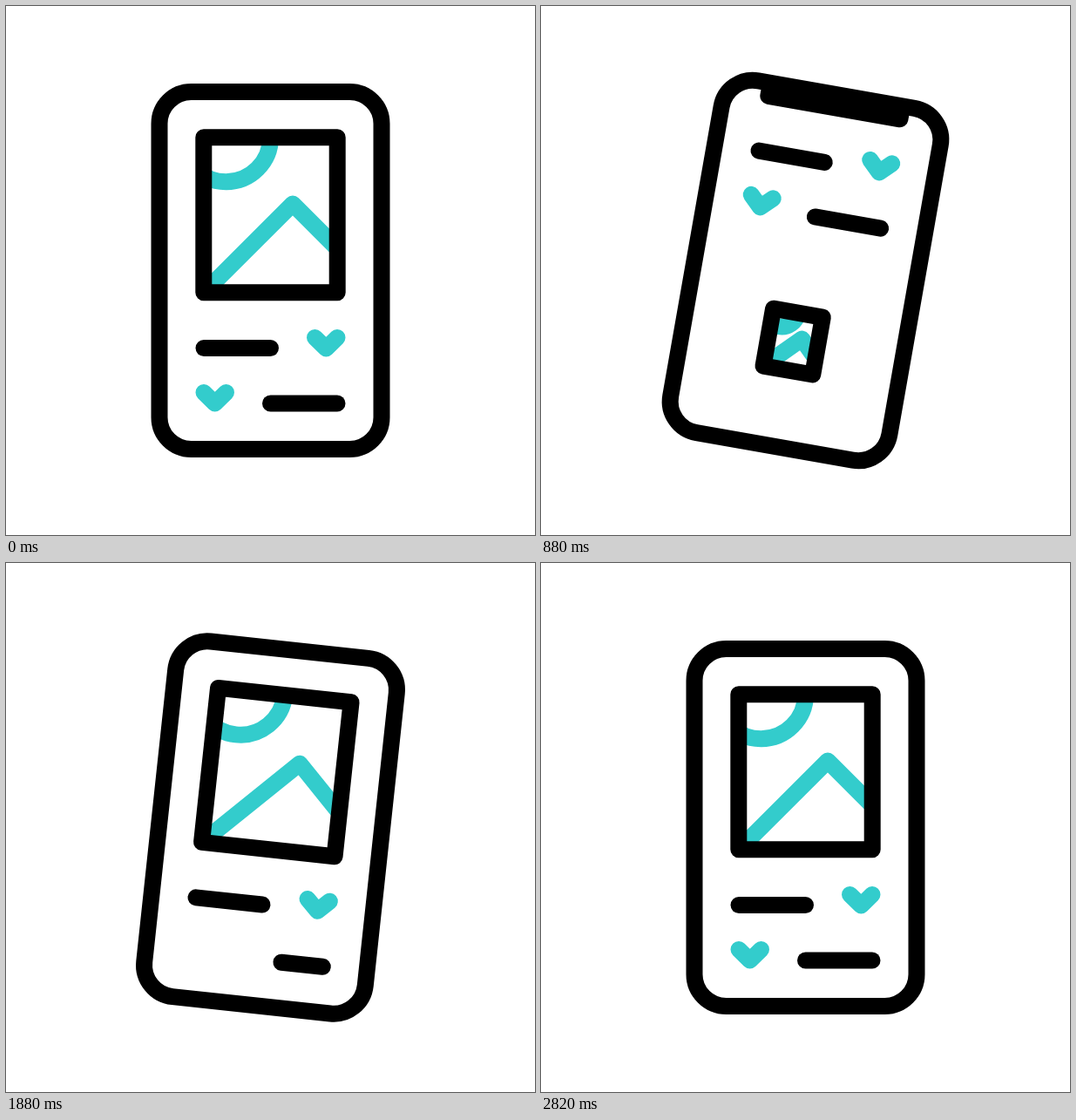
Recreate the animation shown at these times as an HTML page with a canvas. Size 607 by 607 pixels, loop 3600 ms.

```html
<!DOCTYPE html>
<html lang="en">
<head>
<meta charset="utf-8">
<title>Phone feed</title>
<style>
  html, body { margin: 0; height: 100%; overflow: hidden; background: #fff; }
  canvas { display: block; }
</style>
</head>
<body>
<canvas id="stage" width="607" height="607"></canvas>
<script>
const ctx = document.getElementById('stage').getContext('2d');
const LOOP = 3600, CENTER = 303.5, BLACK = '#000', TEAL = '#33cccc';

// Time and value pairs, joined by smooth curves that rest at every extreme.
const TILT = [[0, 0], [380, 5], [540, 9], [750, 11.5], [880, 10], [1220, -5.4], [1420, -9],
  [1880, 6.1], [2110, 11.5], [2480, 4.7], [2700, 1], [2820, 0]];
const SCROLL = [[200, 0], [380, 21.5], [880, 214.6], [1200, 358], [1450, 420]];

const BAR_1 = [[-76.5, 89], [0, 89]];
const HEART_1 = [[51, 77], [63.8, 89.5], [76.5, 77]];
const BAR_2 = [[76.5, 152.5], [0, 152.5]];
const HEART_2 = [[-76.5, 140], [-63.8, 152.5], [-51, 140]];

const ramp = (t, start, end) => Math.min(1, Math.max(0, (t - start) / (end - start)));
const ease = (t, start, end) => {
  const u = ramp(t, start, end);
  return u * u * (3 - 2 * u);
};

function curve(keys, t) {
  const last = keys.length - 1;
  if (t <= keys[0][0]) return keys[0][1];
  if (t >= keys[last][0]) return keys[last][1];
  const i = keys.findIndex(k => k[0] > t) - 1;
  const slope = j => (keys[j + 1][1] - keys[j][1]) / (keys[j + 1][0] - keys[j][0]);
  const tangent = j => {
    if (j === 0 || j === last) return 0;
    const a = slope(j - 1), b = slope(j);
    return a * b <= 0 ? 0 : (a + b) / 2;
  };
  const [t0, v0] = keys[i], [t1, v1] = keys[i + 1];
  const d = t1 - t0, u = (t - t0) / d, w = 1 - u;
  return v0 * w * w * (1 + 2 * u) + v1 * u * u * (3 - 2 * u)
    + d * u * w * (tangent(i) * w - tangent(i + 1) * u);
}

// Strokes the part of a polyline between two fractions of its length.
function line(points, color, to = 1, from = 0) {
  if (to <= from) return;
  let length = 0;
  ctx.beginPath();
  points.forEach(([x, y], i) => {
    ctx.lineTo(x, y);
    if (i) length += Math.hypot(x - points[i - 1][0], y - points[i - 1][1]);
  });
  if (to - from < 1) {
    ctx.setLineDash([length * (to - from), 1e4]);
    ctx.lineDashOffset = -length * from;
  }
  ctx.strokeStyle = color;
  ctx.stroke();
  ctx.setLineDash([]);
}

// The picture grows while its strokes keep their width.
function picture(y, scale) {
  if (scale <= 0) return;
  const w = 76.7 * scale, h = 89 * scale;
  ctx.save();
  ctx.translate(0, y);
  ctx.save();
  ctx.beginPath();
  ctx.rect(-w, -h, 2 * w, 2 * h);
  ctx.fillStyle = '#fff';
  ctx.fill();
  ctx.clip();
  ctx.beginPath();
  ctx.arc(-51 * scale, -h, 51 * scale, 0, 2 * Math.PI);
  ctx.strokeStyle = TEAL;
  ctx.stroke();
  line([[-76.7, 89.3], [25.5, -12.7], [76.7, 38.5]].map(p => p.map(v => v * scale)), TEAL);
  ctx.restore();
  ctx.strokeStyle = BLACK;
  ctx.strokeRect(-w, -h, 2 * w, 2 * h);
  ctx.restore();
}

function captions(bar1, heart1, bar2, heart2) {
  line(BAR_1, BLACK, bar1);
  line(HEART_1, TEAL, heart1);
  line(BAR_2, BLACK, bar2);
  line(HEART_2, TEAL, heart2);
}

function rays(t) {
  const to = ramp(t, 1020, 1310), from = ramp(t, 1310, 1600);
  for (const side of [-1, 1]) {
    line([[side * 172.5, -51], [side * 200.5, -51]], TEAL, to, from);
    for (const dir of [-1, 1]) {
      line([[side * 166, -51 + dir * 45], [side * 185.8, -51 + dir * 64.8]], TEAL, to, from);
    }
  }
}

function draw(t) {
  ctx.setTransform(1, 0, 0, 1, 0, 0);
  ctx.fillStyle = '#fff';
  ctx.fillRect(0, 0, 607, 607);
  ctx.translate(CENTER, CENTER);
  ctx.rotate(curve(TILT, t) * Math.PI / 180);
  ctx.lineWidth = 19;
  ctx.lineCap = ctx.lineJoin = 'round';

  rays(t);

  const body = new Path2D();
  body.roundRect(-127.5, -205, 255, 410, 36.5);
  ctx.save();
  ctx.clip(body);

  if (t < 1450) {
    ctx.save();
    ctx.translate(0, -curve(SCROLL, t));
    picture(-63.8, 1);
    captions(1, 1, 1, 1);
    ctx.restore();
  }

  const grow = ease(t, 675, 1170);
  picture(171 - 234.8 * grow, grow);
  captions(ease(t, 1143, 1483), ease(t, 1413, 1753), ease(t, 1683, 2023), ease(t, 1953, 2293));
  ctx.restore();

  ctx.strokeStyle = BLACK;
  ctx.stroke(body);
}

const begin = performance.now();
function tick() {
  draw((performance.now() - begin) % LOOP);
  requestAnimationFrame(tick);
}
tick();
</script>
</body>
</html>
```
